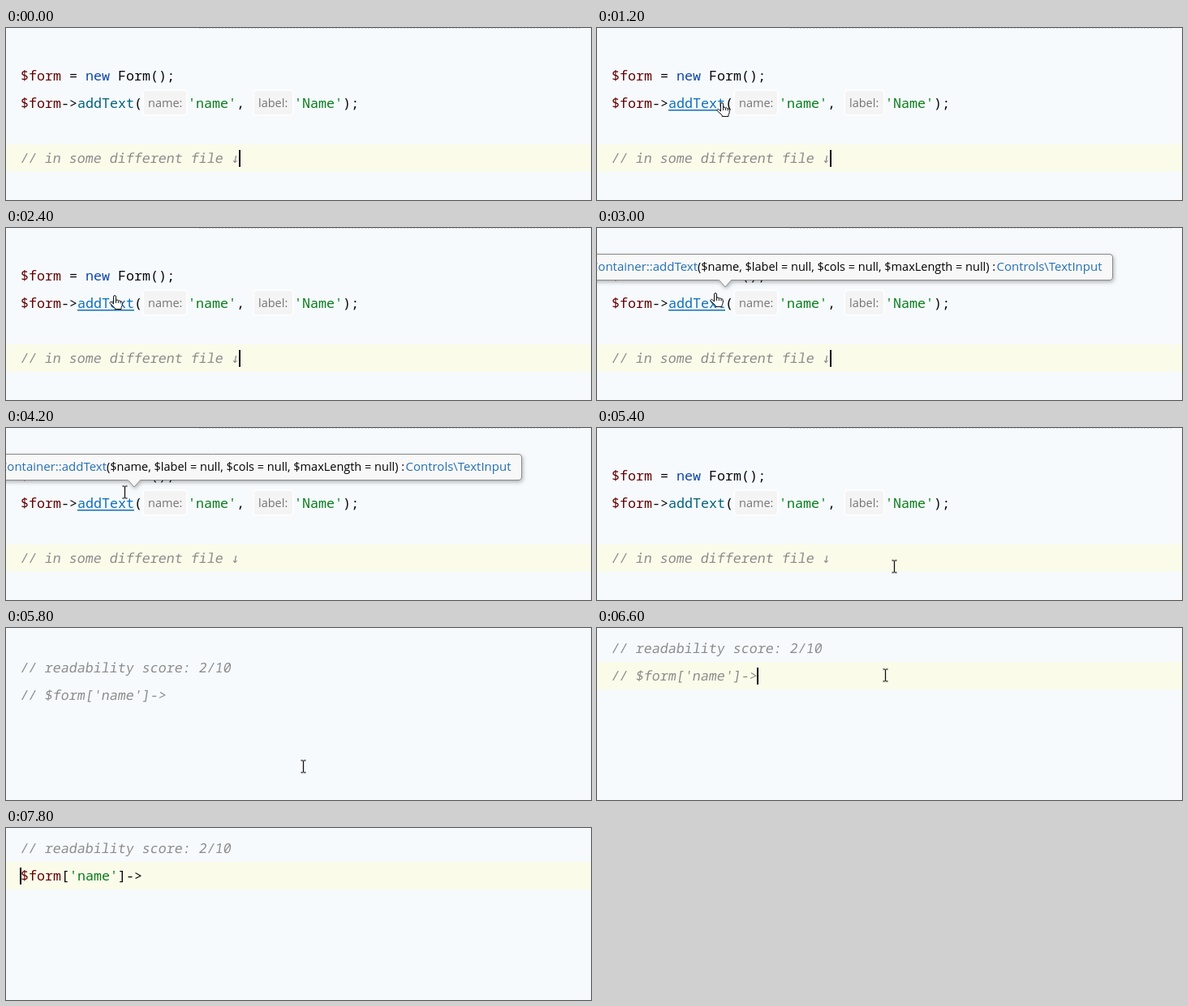
These frames come from a looping animation (721 by 213 pixels, 8000 ms). An HTML page:

```html
<!DOCTYPE html>
<html lang="en">
<head>
<meta charset="utf-8">
<title>Editor</title>
<style>
  html, body { margin: 0; width: 100%; height: 100%; overflow: hidden; background: #f6fafd; }
  svg { display: block; }
  text { white-space: pre; }
  .code { font: 16.667px "Noto Sans Mono", "DejaVu Sans Mono", monospace; fill: #080808; }
  .ui { font: 14.5px "Open Sans", "Noto Sans", sans-serif; fill: #000; }
  .var { fill: #660000; }
  .key { fill: #0f46a8; }
  .fn { fill: #00627a; }
  .str { fill: #067d17; }
  .note { fill: #8c8c8c; }
  .arrow { font-family: "DejaVu Sans Mono", monospace; }
  .blue { font-size: 15px; fill: #2470b3; }
  .hint rect { fill: #f4f4f4; stroke: #fdfdfd; stroke-width: 2; }
  .hint text { fill: #747474; }
  .linked .fn { fill: #0f6fba; }
  #underline { display: none; }
  .linked #underline { display: inline; }
  .halo { fill: none; stroke: #888; stroke-width: 3; stroke-opacity: .3; }
  .ink { fill: none; stroke: #111; stroke-width: 1; }
</style>
</head>
<body>
<svg width="721" height="213" viewBox="0 0 721 213">
  <defs>
    <filter id="shadow" x="-5%" y="-30%" width="110%" height="180%">
      <feDropShadow dx="1" dy="2" stdDeviation="2.5" flood-color="#000" flood-opacity=".3"/>
    </filter>
    <path id="beamPath" d="M-3-7.5H-1L0-6.5L1-7.5H3M0-6.5V6.5M-3 7.5H-1L0 6.5L1 7.5H3"/>
  </defs>

  <g id="doc">
    <rect id="row" width="721" height="34" fill="#fbfbea"/>
    <path d="M238 .5H708" stroke="#d3d7da" stroke-dasharray="2 2"/>

    <text class="code" x="18" y="65"><tspan class="var">$form</tspan> = <tspan class="key">new</tspan> Form();</text>

    <g id="call">
      <text class="code" x="18" y="99"><tspan class="var">$form</tspan>-&gt;<tspan class="fn">addText</tspan>(</text>
      <path id="underline" d="M88 101.75H158" stroke="#0f6fba" stroke-width="1.5"/>
      <g class="hint"><rect x="169" y="77" width="54" height="31" rx="4"/><text class="ui" x="175" y="98">name:</text></g>
      <text class="code" x="224" y="99"><tspan class="str">'name'</tspan>,</text>
      <g class="hint"><rect x="305" y="77" width="49" height="31" rx="4"/><text class="ui" x="311" y="98">label:</text></g>
      <text class="code" x="355" y="99"><tspan class="str">'Name'</tspan>);</text>
    </g>

    <text class="code note" transform="translate(17 167) skewX(-9)">// in some different file <tspan class="arrow">↓</tspan></text>
    <text class="code note" transform="translate(17 235) skewX(-9)">// readability score: 2/10</text>
    <text id="noted" class="code note" transform="translate(17 269) skewX(-9)">// $form['name']-&gt;</text>
    <text id="plain" class="code" y="269"><tspan class="var">$form</tspan>[<tspan class="str">'name'</tspan>]-&gt;</text>
    <rect id="caret" width="2" height="21" fill="#000"/>
  </g>

  <g id="tip">
    <path d="M-10 32.5H632Q635.5 32.5 635.5 36V61Q635.5 64.5 632 64.5H165.5L158 73L150.5 64.5H-10Z"
          fill="#f8f8f8" stroke="#8a8a8a" filter="url(#shadow)"/>
    <text class="ui blue" x="124" y="53" text-anchor="end">Container::addText</text>
    <text class="ui" x="124" y="53">($name, $label = null, $cols = null, $maxLength = null) :</text>
    <text class="ui blue" x="492.5" y="53">Controls\TextInput</text>
  </g>

  <g id="beam">
    <use href="#beamPath" class="halo"/>
    <use href="#beamPath" class="ink"/>
  </g>
  <g id="hand">
    <path d="M5.5 11V2.2Q5.5.6 7 .6T8.5 2.2V7Q8.8 5.9 10 6T11.3 7.4Q11.8 6.6 12.8 6.8T14 8.2Q14.6 7.6 15.4 7.9T16.2 9.3V12Q16.2 14 15 15.5V17.5H7.2V16L1.3 10.6Q.5 9.4 1.5 8.7T3.6 9.2Z"
          fill="#fff" stroke="#111" stroke-linejoin="round"/>
    <path d="M8.5 7V10M11.3 7.4V10M14 8.2V10.4" class="ink"/>
  </g>
</svg>

<script>
const LOOP = 8000;
const $ = id => document.getElementById(id);

// Every track is a list of [start ms, ...values], held until the next step.
const mouse = [
  [0, ''],
  [400, 'beam', 398.5, 119.5], [800, 'beam', 399.5, 118.5], [1000, 'beam', 345.5, 112.5],
  [1200, 'hand', 147, 92],
  [1600, 'beam', 157.5, 99.5], [1800, 'beam', 197.5, 105.5], [2000, 'beam', 267.5, 98.5],
  [2400, 'hand', 127, 83], [3000, 'hand', 139, 80],
  [4200, 'beam', 146.5, 79.5], [4400, 'beam', 232.5, 146.5], [4800, 'beam', 366.5, 171.5],
  [6200, 'beam', 360.5, 71.5], [6400, 'beam', 355.5, 58.5],
  [7400, '']
];
const link = [[0, false], [1200, true], [1600, false], [2400, true], [4400, false]];
const tip = [[0, false], [3000, true], [4400, false]];
const blink = [[0, true], [3400, false], [3800, true], [4200, false], [4400, true], [5400, false], [6600, true]];
const caret = [[0, 287, 167], [6600, 197, 269], [7200, 17, 269]];
const scroll = [[0, 0], [5600, 79], [5800, 180], [6000, 204]];
const plain = [[0, 0], [7400, 28], [7800, 18]];

const at = (track, t) => track.findLast(step => step[0] <= t).slice(1);
const show = (id, on) => { $(id).style.display = on ? '' : 'none'; };
const move = (id, x, y) => $(id).setAttribute('transform', `translate(${x} ${y})`);

function draw(t) {
  const [shape, mx, my] = at(mouse, t);
  for (const id of ['beam', 'hand']) {
    show(id, id === shape);
    if (id === shape) move(id, mx, my);
  }

  const [cx, base] = at(caret, t);
  move('caret', cx, base - 16);
  move('row', 0, base - 23);
  show('caret', at(blink, t)[0]);

  const [codeX] = at(plain, t);
  show('noted', !codeX);
  show('plain', codeX);
  $('plain').setAttribute('x', codeX);

  $('call').classList.toggle('linked', at(link, t)[0]);
  show('tip', at(tip, t)[0]);
  move('doc', 0, -at(scroll, t)[0]);
}

const start = performance.now();
function tick() {
  draw((performance.now() - start) % LOOP);
  requestAnimationFrame(tick);
}
tick();
</script>
</body>
</html>
```
